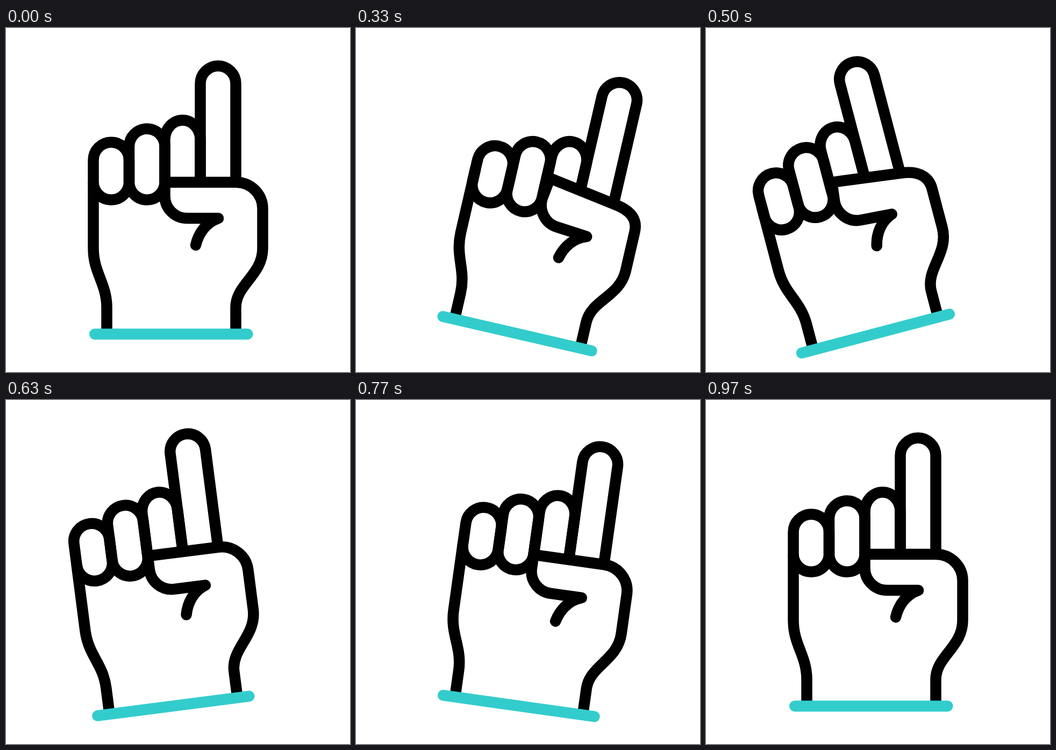
Animation, 640 px wide and 640 px high, one loop 1670 ms. Source, as an HTML page:

```html
<!DOCTYPE html>
<html lang="en">
<head>
<meta charset="utf-8">
<title>Wagging finger</title>
<style>
  html, body { margin: 0; width: 100%; height: 100%; overflow: hidden; background: #fff; }
  svg { display: block; width: 100%; height: 100%; }
  #hand path, #hand rect { stroke: #000; stroke-width: 20.5; stroke-linejoin: round; }
</style>
</head>
<body>
<svg viewBox="0 0 640 640">
  <g id="hand" fill="none">
    <path d="M361.5 300V103.5a33 33 0 0 1 66 0V300"/>
    <path id="middle" d="M295.5 287V207.5a33 36 0 0 1 66 0V287"/>
    <path id="palm" fill="#fff" stroke-linecap="round"/>
    <path d="M162.5 287V410C162.5 456 187.5 475 187.5 520V560"/>
    <rect id="ring" x="229" y="187.5" width="66.5" height="132.3" rx="33.25"/>
    <rect id="pinky" x="162.5" y="212.5" width="66.5" height="107.3" rx="33.25"/>
    <path d="M165.2 569.5H449.3" stroke-linecap="round" style="stroke:#3cc"/>
  </g>
</svg>
<script>
const LOOP = 1670;
const FRAMES_PER_MS = 0.03;
const PIVOT = "307.25 537.3";
const DROP = 27;

// Keys are [frame, value] pairs.
const SWING = [[3, 0], [10, 13], [16, -16], [23, 8], [29, 0]];
const MIDDLE = [[3, 0], [10, 1], [18, 0]];
const RING = [[3, 0], [11, 1], [19, 0]];
const PINKY = [[3, 0], [12, 1], [20, 0]];

const el = id => document.getElementById(id);
const hand = el("hand"), palm = el("palm");
const middle = el("middle"), ring = el("ring"), pinky = el("pinky");

// Cubic bezier (.5, 0, .5, 1).
function ease(x) {
  let lo = 0, hi = 1;
  for (let i = 0; i < 24; i++) {
    const s = (lo + hi) / 2, r = 1 - s;
    if (1.5 * s * r + s * s * s < x) lo = s; else hi = s;
  }
  return lo * lo * (3 - 2 * lo);
}

function valueAt(keys, frame) {
  if (frame <= keys[0][0]) return keys[0][1];
  for (let i = 1; i < keys.length; i++) {
    const [a, from] = keys[i - 1], [b, to] = keys[i];
    if (frame < b) return from + (to - from) * ease((frame - a) / (b - a));
  }
  return keys[keys.length - 1][1];
}

// Right wrist, knuckle, thumb and crease; w bends the thumb.
function palmPath(w) {
  const p = (x, y, dx, dy) => `${x + dx * w} ${y + dy * w} `;
  return "M427.5 560V520C427.5 477 477.5 460 477.5 410V336" +
    "C477.5 308.7 " + p(455.3, 287, 1.5, 12) + p(428, 287, 2, 8) +
    "L" + p(295.5, 287, 6.5, -14) +
    "L" + p(295.5, 313, 0.5, 1) +
    "C" + p(295.5, 335.6, -1, 1.5) + p(314, 354, -3, 4) + p(337, 354, -3, 6) +
    "L" + p(395, 354, -2.8, 11.4) +
    "C" + p(372, 362, -2.8, 11.4) + p(358, 382, -2.8, 11.4) + p(353, 404, -2.8, 11.4);
}

function slide(node, amount) {
  node.setAttribute("transform", `translate(0 ${DROP * amount})`);
}

function draw(ms) {
  const frame = Math.floor((ms % LOOP + 3.4) * FRAMES_PER_MS);
  const bend = valueAt(PINKY, frame);
  hand.setAttribute("transform", `rotate(${valueAt(SWING, frame)} ${PIVOT})`);
  slide(middle, valueAt(MIDDLE, frame));
  slide(ring, valueAt(RING, frame));
  slide(pinky, bend);
  palm.setAttribute("d", palmPath(bend));
}

const start = performance.now();
function tick() {
  draw(performance.now() - start);
  requestAnimationFrame(tick);
}
draw(0);
requestAnimationFrame(tick);
</script>
</body>
</html>
```
